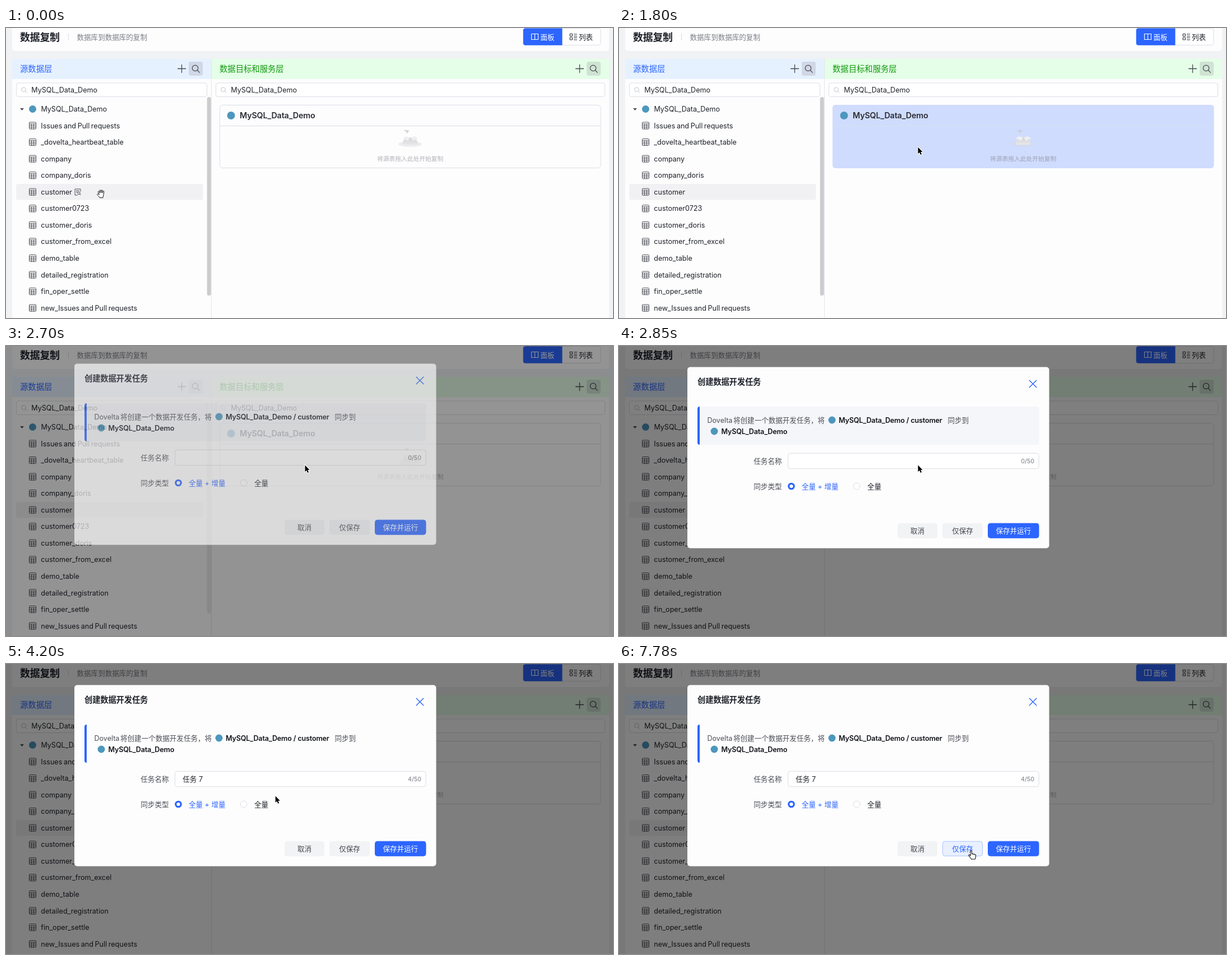
These frames come from a looping animation (1083 px wide and 517 px high, 8 s). An HTML page with a canvas:

```html
<!DOCTYPE html>
<html lang="zh-CN">
<head>
<meta charset="utf-8">
<title>数据复制</title>
<style>
html, body { margin: 0; width: 100%; height: 100%; overflow: hidden; background: #f1f2f4; }
canvas { display: block; width: 1083px; height: 517px; }
</style>
</head>
<body>
<canvas id="stage" width="1083" height="517"></canvas>
<script>
const W = 1083, H = 517, LOOP = 8000;
const BLUE = '#2c65ff', INK = '#1f2228', GREY = '#4c4e56', LINE = '#dcdee4', LOGO = '#4d97bd';
const SM = 10.76, MD = 12.55, LG = 14.34, XL = 17.93;
const FONT = 'Inter, "Noto Sans CJK SC", "Noto Sans CJK", sans-serif';
const TABLES = ['Issues and Pull requests', '_dovelta_heartbeat_table', 'company', 'company_doris',
  'customer', 'customer0723', 'customer_doris', 'customer_from_excel', 'demo_table',
  'detailed_registration', 'fin_oper_settle', 'new_Issues and Pull requests'];

const main = document.getElementById('stage').getContext('2d');
const layer = document.createElement('canvas');
layer.width = W;
layer.height = H;
const over = layer.getContext('2d');
let g = main;

// y is the vertical middle of the glyphs
function text(s, x, y, size, color, weight = 400, align = 'left') {
  g.font = `${weight} ${size}px ${FONT}`;
  g.letterSpacing = weight >= 600 ? `${-size * .012}px` : '0px';
  g.textAlign = align;
  g.fillStyle = color;
  g.fillText(s, x, y + size * 0.37);
}

function box(x, y, w, h, r, fill, stroke) {
  g.beginPath();
  g.roundRect(x, y, w, h, r);
  if (fill) { g.fillStyle = fill; g.fill(); }
  if (stroke) { g.strokeStyle = stroke; g.lineWidth = 1; g.stroke(); }
}

function disc(x, y, r, fill, stroke) {
  g.beginPath();
  g.arc(x, y, r, 0, 7);
  if (fill) { g.fillStyle = fill; g.fill(); }
  if (stroke) { g.strokeStyle = stroke; g.lineWidth = 1; g.stroke(); }
}

function path(d, x, y, stroke, width = 1, fill) {
  const p = new Path2D(d);
  g.save();
  g.translate(x, y);
  g.lineJoin = g.lineCap = 'round';
  if (fill) { g.fillStyle = fill; g.fill(p); }
  if (stroke) { g.strokeStyle = stroke; g.lineWidth = width; g.stroke(p); }
  g.restore();
}

function lens(x, y, r, color, width) {
  path(`M${r} 0A${r} ${r} 0 1 1 ${-r} 0A${r} ${r} 0 1 1 ${r} 0M${r * 0.72} ${r * 0.72}L${r * 1.5} ${r * 1.5}`,
    x, y, color, width);
}

function tableIcon(x, y) {
  box(x + .5, y - 6, 12, 12, 1, null, GREY);
  path('M.5 -3H12.5M.5 0H12.5M.5 3H12.5M4.5 -3V6M8.5 -3V6', x, y, GREY, .9);
}

function header(x, w, bg, title, color) {
  g.fillStyle = bg;
  g.fillRect(x, 55, w, 36);
  text(title, x + 14, 73, LG, color, 500);
  const r = x + w;
  path('M-7 0H7M0 -7V7', r - 52.5, 72.5, '#44464c', 1.3);
  box(r - 40, 60, 25, 25, 4, 'rgba(60,50,70,.13)');
  lens(r - 28.5, 71.5, 5.2, '#44464c', 1.2);
}

function searchField(x, w) {
  box(x + .5, 98, w, 24.5, 4, '#fff', LINE);
  lens(x + 13.5, 109.8, 3.8, '#c0c3ca', 1);
  text('MySQL_Data_Demo', x + 27.3, 110.5, MD, INK);
}

function emptyBox() {
  g.fillStyle = 'rgba(215,215,219,.42)';
  g.beginPath();
  g.ellipse(721, 207, 21, 5, 0, 0, 7);
  g.fill();
  const shade = g.createLinearGradient(0, -1, 0, 14);
  shade.addColorStop(0, '#d2d2d5');
  shade.addColorStop(1, '#e9e9eb');
  path('M0 8L4 0H22L26 8V13H0Z', 708, 195, null, 1, shade);
  path('M0 4L5 0L13 2L9 8ZM14 2L22 0L27 4L18 8Z', 708, 193, null, 1, '#efeff1');
  path('M0 0L10 1L6 7L4.5 4Z', 709.5, 181.5, null, 1, 'rgba(200,200,205,.75)');
}

function page(t) {
  const held = t < 1350, target = t >= 1650 && t < 2700;
  g.fillStyle = '#f1f2f4';
  g.fillRect(0, 0, W, H);
  box(11, -10, 1065, 51, 5, '#fdfdfe');
  text('数据复制', 25, 16, XL, '#1d2129', 600);
  g.fillStyle = '#dadce1';
  g.fillRect(111, 10, 1, 12);
  text('数据库到数据库的复制', 126.5, 16, MD, '#7d7f86');

  box(923.5, .5, 137.5, 30, 4, '#fff', LINE);
  box(922.7, .5, 69.8, 30.2, [4, 0, 0, 4], BLUE);
  path('M0 0H12V10H0ZM6 0V10', 937.5, 10.5, '#fff', 1.1);
  text('面板', 953.5, 16, MD, '#fff', 500);
  path('M0 0H4V4H0ZM0 6.5H4V10.5H0ZM7 .5H12M7 4H12M7 7H12M7 10.5H12', 1006.5, 10.5, INK, 1);
  text('列表', 1022, 16, MD, INK);

  g.fillStyle = '#fdfdfe';
  g.fillRect(11, 55, 1065, 462);
  header(11, 355, '#e6f1ff', '源数据层', BLUE);
  header(367, 709, '#e5fee8', '数据目标和服务层', '#109a0c');
  g.fillStyle = '#e4e5e9';
  g.fillRect(366, 55, 1, 462);
  searchField(18, 340);
  searchField(374, 694);

  path('M0 0H7L3.5 4Z', 25, 143, null, 1, GREY);
  disc(47.5, 144.5, 6.5, LOGO);
  text('MySQL_Data_Demo', 62.4, 144.5, MD, INK);
  box(18, 278, 333.5, 28.5, 4, '#f1f1f3');
  g.wordSpacing = '-0.9px';
  TABLES.forEach((name, i) => {
    const y = 174 + i * 29.55;
    tableIcon(41, y);
    text(name, 62.3, y, MD, INK);
  });
  g.wordSpacing = '0px';
  if (held) {
    path('M5 11.5H.5V.5H10.5V5M2.8 3.5H8M2.8 6H5', 122.5, 286.5, GREY, 1);
    lens(130, 294.5, 2.2, GREY, 1);
  }
  // The scrollbar fades out as the dialog opens
  const bar = t < 2700 ? .23 : t < 2850 ? .09 : 0;
  box(358.7, 123, 7, 354, 3.5, `rgba(40,40,48,${bar})`);

  if (target) box(381, 137, 680.5, 113, 5, '#cfdcfe');
  else box(381.5, 137.5, 679.5, 112, 5, '#fdfdfe', LINE);
  g.fillStyle = target ? '#d9dee9' : LINE;
  g.fillRect(382, 174, 679, 1);
  disc(401.5, 156, 7, LOGO);
  text('MySQL_Data_Demo', 417, 156, LG, '#2b2d34', 600);
  emptyBox();
  text('将源表拖入此处开始复制', 662, 233.2, SM, target ? '#9da2b2' : '#b2b3b8');
}

function button(x, w, label, style) {
  const [bg, fg, edge] = style;
  box(x + .5, 316.2, w - 1, 26, 4, bg, edge || bg);
  text(label, x + w / 2, 329.3, MD, fg, 400, 'center');
}

function dialog(t, hover) {
  const named = t >= 3300;
  box(122, 37.6, 645.5, 322.9, 5, '#fdfdfe');
  text('创建数据开发任务', 140, 64, LG, '#1d2129', 600);
  path('M-6.3 -6.3L6.3 6.3M6.3 -6.3L-6.3 6.3', 738.5, 67.5, BLUE, 1.4);

  box(140, 108, 609.5, 68, 4, t < 3000 ? '#f5f6f9' : '#fdfdfe');
  box(140, 108, 4, 68, [4, 0, 0, 4], BLUE);
  text('Dovelta', 157.5, 132.3, MD, GREY);
  text('将创建一个数据开发任务，将', 204, 132.3, MD, GREY);
  disc(380, 132, 6.5, LOGO);
  text('MySQL_Data_Demo / customer', 392, 132.3, MD, '#111318', 600);
  text('同步到', 586.5, 132.3, MD, GREY);
  disc(170, 152, 6.5, LOGO);
  text('MySQL_Data_Demo', 182.4, 152.3, MD, '#111318', 600);

  text('任务名称', 240.3, 205, MD, GREY);
  box(301.5, 191.2, 447.5, 27.5, 4, '#fff', LINE);
  if (named) text('任务 7', 315.3, 205, MD, INK);
  text(named ? '4/50' : '0/50', 741, 205.5, SM, '#777a82', 400, 'right');

  text('同步类型', 240.3, 250, MD, GREY);
  disc(307.5, 250, 6.3, BLUE);
  disc(307.5, 250, 3.1, '#fff');
  text('全量 + 增量', 326, 250, MD, BLUE);
  disc(424, 250, 5.9, '#fff', LINE);
  text('全量', 443, 250, MD, INK);

  const plain = ['#f2f3f5', '#44464c'];
  button(497, 71, '取消', plain);
  button(577, 72, '仅保存', hover ? ['#e9f0ff', BLUE, '#a9c2ff'] : plain);
  button(658, 91.5, '保存并运行', [BLUE, '#fff']);
}

const CURSORS = {
  arrow: 'M0 0V11.7L2.7 9.2L4.5 13.4L6.5 12.5L4.7 8.4H8.2Z',
  point: 'M5 10V2.2a1.3 1.3 0 0 1 2.6 0V7c.3-1 2.3-.9 2.5.3c.4-.8 2.2-.6 2.4.5c.5-.6 2-.2 2 1.2v2.6' +
    'c0 2-1 2.8-1.4 4.4H6.6C6 14 3.5 11.8 2 9.6c-.7-1.1.8-2.2 1.8-1.2Z',
  grip: 'M3 7c0-3 2-2.8 2.4-2.2c.4-1 2.2-1 2.6 0c.4-.9 2.2-.7 2.5.2c.6-.6 2.2-.4 2.3 1V9' +
    'c0 2.5-1.2 3-1.4 5H5.2C4.8 12.5 2.5 11.5 2 9.6c-.3-1 .2-1.6 1-1.6Z',
  open: 'M5.2 9L3.2 4.8c-.4-1.2 1.4-1.8 2-.6L6.4 6.6L6 2.4c0-1.4 1.9-1.5 2.1-.2L8.6 6L9.2 2' +
    'c.3-1.2 2-1 2 .3L10.9 6.4L12 3.6c.5-1.1 2-.6 1.8.6L13 10c-.3 2-1 3-1.2 5H6.2' +
    'C5.6 13 3 11.4 1.9 9.6c-.6-1.2.9-2 1.7-1.2Z'
};

const smooth = p => p * p * (3 - 2 * p);
const settle = p => 1 - (1 - p) ** 1.4;
const MOVES = [
  { at: 1350, steps: 4, gap: 150, from: [168, 297], to: [533, 212], ease: smooth },
  { at: 3750, steps: 7, gap: 148.4, from: [533, 212], to: [457, 245], ease: settle },
  { at: 6740, steps: 8, gap: 148.6, from: [457, 245], to: [628, 333], ease: smooth }
];

function pointer(t) {
  const m = MOVES.filter(m => t >= m.at).pop();
  if (!m) return MOVES[0].from;
  const p = m.ease(Math.min(1, (Math.floor((t - m.at + .5) / m.gap) + 1) / m.steps));
  return m.from.map((a, i) => a + (m.to[i] - a) * p);
}

const inside = ([x, y], l, top, r, b) => x >= l && x <= r && y >= top && y <= b;

function cursor(t, pos, clickable) {
  if (t < 150) return path(CURSORS.open, 161, 287.6, '#111', 1, '#fff');
  if (t < 1350) return path(CURSORS.grip, 161.7, t < 1200 ? 288.2 : 289, '#111', 1.2, '#fff');
  const [x, y] = pos;
  if (clickable) return path(CURSORS.point, x - 6, y - 1, '#111', 1.1, '#fff');
  path(CURSORS.arrow, x + .5, y + .5, '#fff', 2.2);
  path(CURSORS.arrow, x + .5, y + .5, null, 1, '#000');
}

function draw(t) {
  const pos = pointer(t), open = t >= 2700, fading = t < 2850;
  const onSave = open && inside(pos, 577, 316, 649, 343);
  const onRadio = open && inside(pos, 418, 243, 468, 257);
  g = main;
  page(t);
  if (open) {
    g.fillStyle = `rgba(0,0,0,${fading ? .42 : .5})`;
    g.fillRect(0, 0, W, H);
    g = over;
    g.clearRect(0, 0, W, H);
    dialog(t, onSave);
    g = main;
    g.globalAlpha = fading ? .67 : 1;
    g.drawImage(layer, 0, fading ? -6 : 0);
    g.globalAlpha = 1;
  }
  cursor(t, pos, onSave || onRadio);
}

const start = performance.now();
function tick() {
  draw((performance.now() - start) % LOOP);
  requestAnimationFrame(tick);
}
tick();
</script>
</body>
</html>
```
